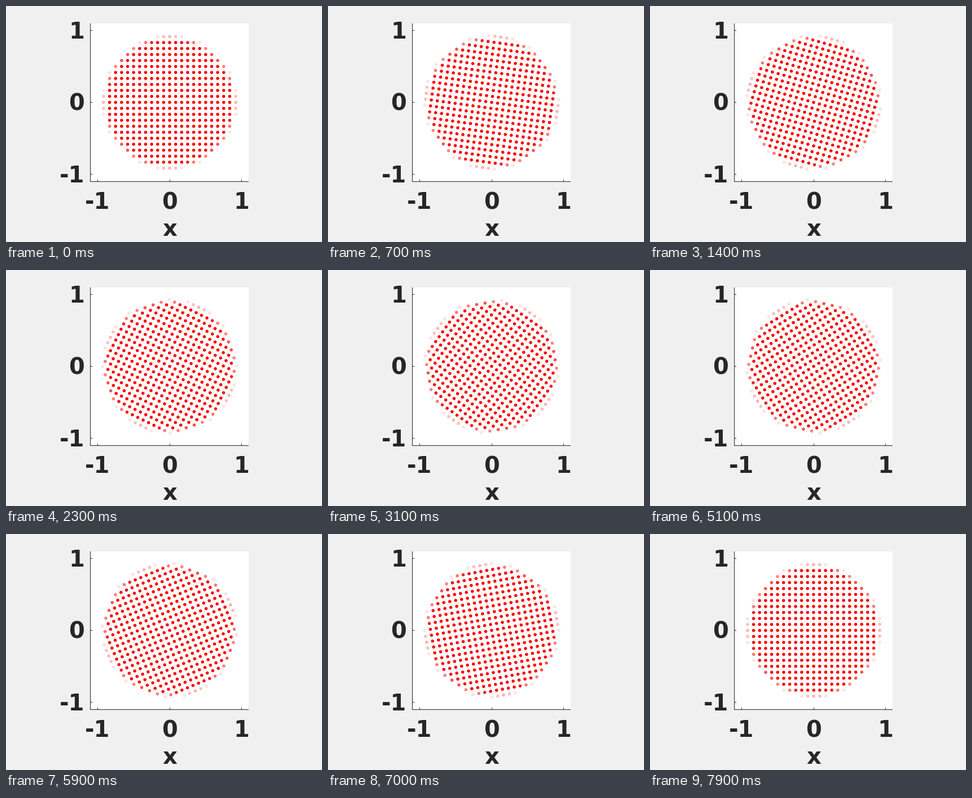
Write a matplotlib script that moves like this. It is 560 px wide and 420 px high and loops after 8 s.

```python
import numpy as np
import matplotlib.pyplot as plt
from matplotlib.animation import FuncAnimation
from matplotlib.patches import Rectangle

W, H, DPI = 560, 420, 100
FRAMES, INTERVAL = 80, 100
CX, CY, UNIT = 290, 171.5, 127.7      # axes centre and pixels per data unit
STEP = np.radians(1.138)              # clockwise turn per frame
INK = "#262626"

fig = plt.figure(figsize=(W / DPI, H / DPI), dpi=DPI, facecolor="#f0f0f0")
ax = fig.add_axes([0, 0, 1, 1])
ax.set(xlim=(0, W), ylim=(H, 0))
ax.axis("off")


def box(x, y, w, h, color):
    ax.add_patch(Rectangle((x, y), w, h, fc=color, ec="none", lw=0,
                           antialiased=False))


def label(x, y, text, ha="center"):
    ax.text(x, y, text, ha=ha, va="baseline", color=INK,
            family="DejaVu Sans", weight="bold", size=40 * 72 / DPI)


# Plot area, the two axis lines, ticks and labels
box(149, 31, 281, 281, "white")
box(149, 31, 1, 282, INK)
box(149, 312, 281, 1, INK)
for v in (-1, 0, 1):
    tx, ty = CX + v * UNIT, CY - v * UNIT
    box(int(tx), 309, 1, 3, INK)
    box(150, int(ty), 3, 1, INK)
    label(tx, 361, str(v))
    label(139, ty + 14.5, str(v), ha="right")
label(CX, 409, "x")

# Square lattice that fades out near the rim of the disc
gx, gy = np.meshgrid(np.arange(-11, 12) / 12, np.arange(-11, 12) / 12)
r = np.hypot(gx, gy)
alpha = np.clip((0.941 - r) / 0.08, 0, 1)
keep = alpha > 0
px, py, alpha = gx[keep], gy[keep], alpha[keep]
colors = np.column_stack([np.ones_like(alpha), 1 - alpha, 1 - alpha])
dots = ax.scatter(px, py, s=(5.6 * 72 / DPI) ** 2, c=colors, linewidths=0,
                  zorder=3)
dots.set_snap(False)


def update(i):
    c, s = np.cos(i * STEP), np.sin(i * STEP)
    x, y = c * px + s * py, c * py - s * px
    dots.set_offsets(np.column_stack([CX + UNIT * x, CY - UNIT * y]))
    return (dots,)


anim = FuncAnimation(fig, update, frames=FRAMES, interval=INTERVAL,
                     repeat=True, repeat_delay=0)
plt.show()
```
